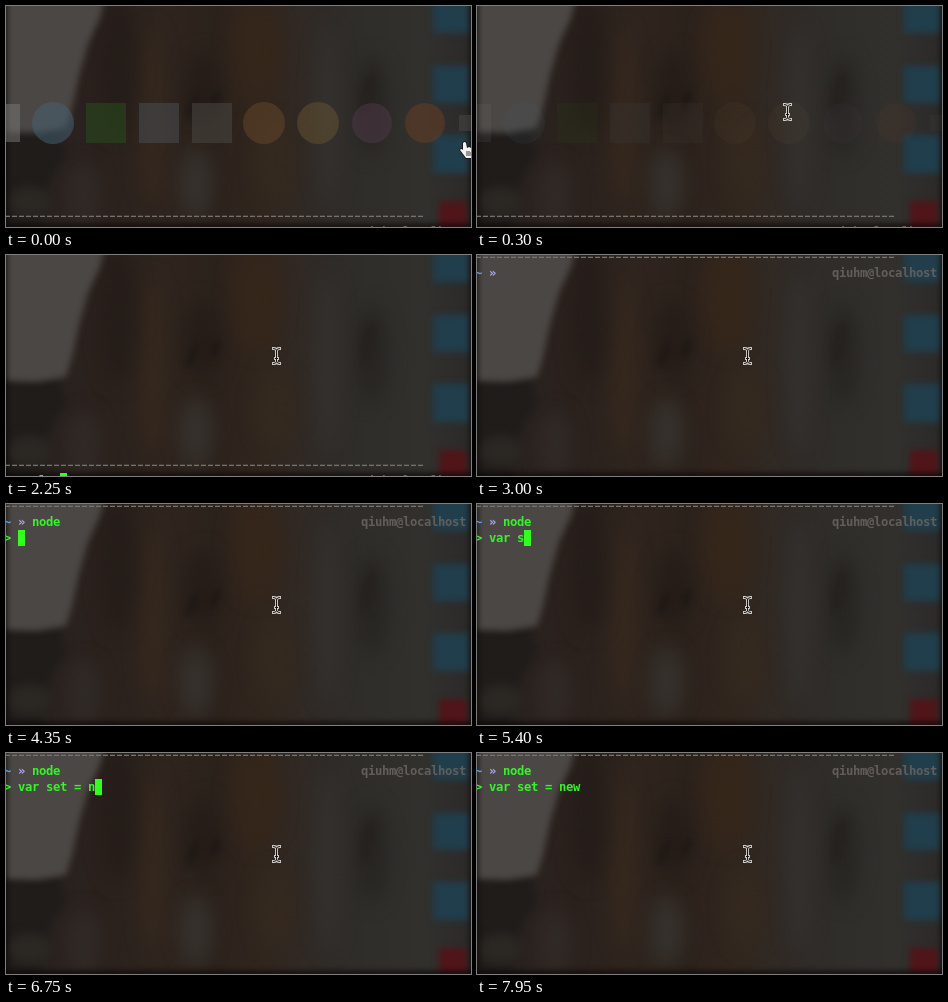
Animation of 465x221 px, one loop 8000 ms. Source, as an HTML page with a canvas:

```html
<!DOCTYPE html>
<html lang="en">
<head>
<meta charset="utf-8">
<title>Terminal session</title>
<style>
  html, body { margin: 0; width: 100%; height: 100%; overflow: hidden; background: #2b231e; }
  canvas { display: block; width: 465px; height: 221px; }
</style>
</head>
<body>
<canvas id="stage" width="465" height="221"></canvas>
<script>
const W = 465, H = 221, LOOP = 8000, TICK = 150;
const CELL = 7, ROW = 16, LEFT = -2;
const GREEN = '#35f52a', CURSOR = '#33ff1f', GREY = '#625e5b';
const FONT = 'bold 12.2px "DejaVu Sans Mono", monospace';
const ctx = document.getElementById('stage').getContext('2d');

// time, vertical offset, command, second line, cursor opacity
const steps = [
  [0, 208, '', null, 0],
  [450, 208, '', null, 1],
  [900, 208, '', null, 0.5],
  [1050, 208, '', null, 0],
  [1500, 208, '', null, 1],
  ...['c', 'cl', 'cle', 'clea', 'clear'].map((s, i) => [1800 + i * TICK, 208, s, null, 1]),
  [2550, 0, '', null, 1],
  [3000, 0, '', null, 0],
  [3150, 0, 'n', null, 1],
  [3300, 0, 'nod', null, 1],
  [3450, 0, 'node', null, 1],
  [4050, 0, 'node', null, 0],
  [4200, 0, 'node', '', 1],
  [4350, 0, 'node', '> ', 1],
  [4950, 0, 'node', '> va', 1],
  [5100, 0, 'node', '> var ', 1],
  [5400, 0, 'node', '> var s', 1],
  [5550, 0, 'node', '> var se', 1],
  [5700, 0, 'node', '> var set', 1],
  [6150, 0, 'node', '> var set ', 1],
  [6300, 0, 'node', '> var set =', 1],
  [6450, 0, 'node', '> var set = ', 1],
  [6750, 0, 'node', '> var set = n', 1],
  [7350, 0, 'node', '> var set = new', 1],
  [7950, 0, 'node', '> var set = new', 0]
];

// dock icons: centre x, half size, colour, round
const icons = [
  [-5, 19, '#7b7a78', false],
  [47, 21, '#476577', true],
  [100, 20, '#29501f', false],
  [153, 20, '#4b5059', false],
  [206, 20, '#4d4a47', false],
  [258, 21, '#67482a', true],
  [312, 21, '#665431', true],
  [366, 20, '#513948', true],
  [419, 20, '#6b3f25', true],
  [461, 8, '#4b4947', false]
];
const iconFade = [0.5, 0.3, 0.12];
const pointerPath = [[460, 143], [395, 126], [310, 106], [270, 101]];

function polygon(c, color, points) {
  c.fillStyle = color;
  c.beginPath();
  points.forEach(([x, y]) => c.lineTo(x, y));
  c.closePath();
  c.fill();
}

function blob(c, color, x, y, rx, ry, tilt = 0) {
  c.fillStyle = color;
  c.beginPath();
  c.ellipse(x, y, rx, ry, tilt, 0, Math.PI * 2);
  c.fill();
}

function makeBackdrop() {
  const layer = document.createElement('canvas');
  layer.width = W;
  layer.height = H;
  const c = layer.getContext('2d');
  const base = c.createLinearGradient(0, 0, W, 0);
  [[0, '#2a2522'], [0.2, '#2a211d'], [0.34, '#2f251e'], [0.45, '#2c221c'],
   [0.55, '#31261e'], [0.66, '#302a26'], [0.75, '#2f2d2a'], [0.9, '#31302d'],
   [1, '#2b2a29']].forEach(([p, color]) => base.addColorStop(p, color));
  c.fillStyle = base;
  c.fillRect(0, 0, W, H);

  c.filter = 'blur(9px)';
  blob(c, '#35281e', 146, 110, 12, 90);
  blob(c, '#35261a', 250, 45, 24, 50);
  blob(c, '#251d19', 112, 60, 18, 70);
  blob(c, '#261d18', 196, 85, 18, 40);
  blob(c, '#35312d', 190, 178, 16, 34);
  blob(c, '#302a26', 78, 190, 16, 34);
  blob(c, '#34291f', 270, 155, 20, 40);
  blob(c, '#282623', 366, 100, 16, 50);
  blob(c, '#33312e', 322, 110, 12, 90);
  c.filter = 'blur(5px)';
  polygon(c, '#1f1c1a', [[-20, 122], [54, 124], [60, 150], [44, 172], [30, 240], [-20, 240]]);
  blob(c, '#2b2723', 24, 196, 22, 16);
  c.filter = 'blur(3px)';
  blob(c, '#1f1916', 187, 100, 5, 14, 0.4);
  blob(c, '#1d1815', 209, 94, 4, 11, 0.3);
  blob(c, '#252220', 362, 88, 7, 22, 0.2);
  polygon(c, '#4b4744', [[-20, -20], [102, -20], [94, 12], [82, 38], [73, 70],
    [66, 102], [60, 122], [30, 127], [-20, 125]]);
  c.fillStyle = '#203e4b';
  [[-8, 35], [60, 37], [129, 38]].forEach(([y, h]) => c.fillRect(427, y, 37, h));
  c.fillStyle = '#501519';
  c.fillRect(433, 195, 28, 36);
  c.filter = 'blur(2px)';
  c.fillStyle = 'rgba(12, 8, 8, 0.6)';
  c.fillRect(-4, 217, W + 8, 9);
  c.fillRect(-4, -4, 6, H + 8);
  c.fillRect(W - 2, -4, 6, H + 8);
  c.filter = 'none';
  return layer;
}

function write(text, col, top, color) {
  ctx.font = FONT;
  ctx.fillStyle = color;
  [...text].forEach((ch, i) => ctx.fillText(ch, LEFT + (col + i) * CELL, top + 11.5));
}

function drawTerminal([, offset, command, line, cursor]) {
  ctx.fillStyle = '#75716d';
  for (let i = 0; i < 60; i++) ctx.fillRect(LEFT + i * CELL + 1, offset + 1.7, 5, 1.3);

  const top = offset + 10;
  write('~', 0, top, '#4fa6ee');
  write('»', 2, top, '#b0a9ff');
  write(command, 4, top, GREEN);
  write('qiuhm@localhost', 51, top, GREY);
  if (line !== null) write(line, 0, top + ROW, GREEN);

  const col = line === null ? 4 + command.length : line.length;
  ctx.globalAlpha = cursor;
  ctx.fillStyle = CURSOR;
  ctx.fillRect(LEFT + col * CELL, line === null ? top : top + ROW, CELL, ROW);
  ctx.globalAlpha = 1;
}

function drawIcons(alpha) {
  ctx.globalAlpha = alpha;
  icons.forEach(([x, r, color, round]) => {
    if (round) return blob(ctx, color, x, 117, r, r);
    ctx.fillStyle = color;
    ctx.fillRect(x - r, 117 - r, r * 2, r * 2);
  });
  ctx.globalAlpha = 1;
}

function drawHand(x, y) {
  const hand = new Path2D('M-3-6q2-2 3 0l1 5 2-1 2 1 2 0 2 1v5l-2 4h-7l-3-4-3-4q1-2 3 0z');
  ctx.save();
  ctx.translate(x, y);
  ctx.lineWidth = 1.5;
  ctx.strokeStyle = '#111';
  ctx.stroke(hand);
  ctx.fillStyle = '#f2f2f2';
  ctx.fill(hand);
  ctx.lineWidth = 0.8;
  ctx.stroke(new Path2D('M1 2v5M3 2v5M5 3v4'));
  ctx.restore();
}

function drawBeam(x, y) {
  const beam = new Path2D('M-2.5-7.5q3 0 3 2v11q0 2-3 2M3.5-7.5q-3 0-3 2M3.5 7.5q-3 0-3-2M-.5 2.5h2');
  ctx.save();
  ctx.translate(x, y);
  ctx.lineCap = 'square';
  [['#d8d6d4', 2.8], ['#151210', 1]].forEach(([color, width]) => {
    ctx.strokeStyle = color;
    ctx.lineWidth = width;
    ctx.stroke(beam);
  });
  ctx.restore();
}

const backdrop = makeBackdrop();

function draw(now) {
  const t = now % LOOP;
  const tick = Math.floor(t / TICK);
  ctx.drawImage(backdrop, 0, 0);
  drawTerminal(steps.findLast(step => step[0] <= t));
  if (tick < iconFade.length) drawIcons(iconFade[tick]);
  const [x, y] = pointerPath[Math.min(tick, pointerPath.length - 1)];
  (tick === 0 ? drawHand : drawBeam)(x, y);
}

const start = performance.now();
function frame() {
  draw(performance.now() - start);
  requestAnimationFrame(frame);
}
frame();
</script>
</body>
</html>
```
